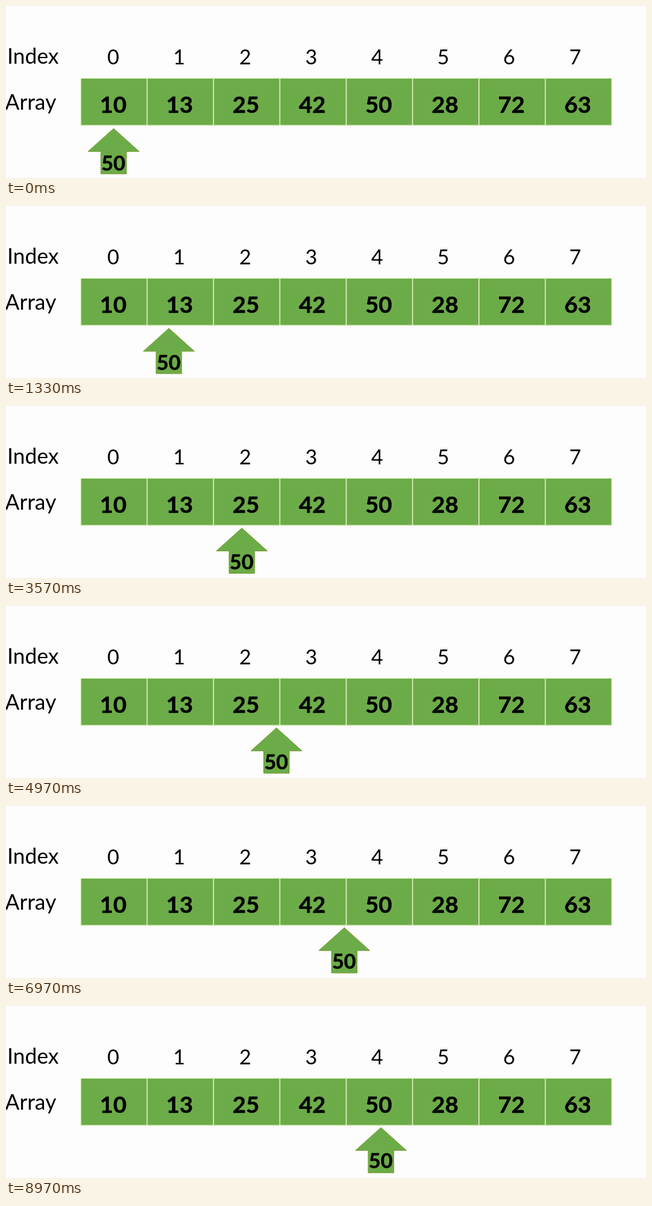
An HTML page that plays this animation: 1027 by 277 pixels, repeating every 9.93 s.

```html
<!DOCTYPE html>
<html lang="en">
<head>
<meta charset="utf-8">
<title>Linear search</title>
<style>
  html, body { margin: 0; width: 100%; height: 100%; overflow: hidden; background: #fdfdfe; }
  svg { display: block; width: 1027px; height: 277px; }
  text { font: 33px Lato, sans-serif; fill: #000; }
  .label { font-size: 34.3px; }
  .mid { text-anchor: middle; }
  .bold { font-size: 37px; font-weight: 700; stroke: #000; stroke-width: .5; }
  #key { font-size: 33px; }
  rect { fill: #6cac48; stroke: #e0efc4; stroke-width: 1.4; }
  path { fill: #6cac48; stroke: #78992f; }
</style>
</head>
<body>
<svg id="stage" viewBox="0 0 1027 277">
  <text class="label" x="2" y="93">Index</text>
  <text class="label" x="-1.5" y="167">Array</text>
  <path id="arrow" d="M0 0L41 37H20.5V73H-20.5V37H-41Z"/>
  <text id="key" class="mid bold">50</text>
</svg>
<script>
const stage = document.getElementById('stage');
const arrow = document.getElementById('arrow');
const key = document.getElementById('key');

function add(tag, attrs, content = '') {
  const el = document.createElementNS('http://www.w3.org/2000/svg', tag);
  for (const name in attrs) el.setAttribute(name, attrs[name]);
  el.textContent = content;
  stage.insertBefore(el, arrow);
}

const PITCH = 106.5, LEFT = 120, CENTER = 172;
[10, 13, 25, 42, 50, 28, 72, 63].forEach((value, i) => {
  const x = CENTER + i * PITCH;
  add('rect', { x: LEFT + i * PITCH, y: 116.3, width: PITCH, height: 76 });
  add('text', { x, y: 171.5, class: 'mid bold' }, value);
  add('text', { x: x - i * 0.6, y: 94, class: 'mid' }, i);
});

const stops = [173, 281, 384, 488, 602];
const LOOP = 9930, STEP = 2000, DELAY = 125, MOVE = 1720;
const ease = u => u < 0.5 ? 2 * u * u : 1 - 2 * (1 - u) ** 2;

function draw(now) {
  const t = now % LOOP;
  const i = Math.min(Math.floor(t / STEP), stops.length - 2);
  const u = ease(Math.min(Math.max((t - i * STEP - DELAY) / MOVE, 0), 1));
  const x = stops[i] + (stops[i + 1] - stops[i]) * u;
  const progress = i + u;
  arrow.setAttribute('transform', `translate(${x - 0.3} ${197.3 - progress * 0.4})`);
  key.setAttribute('x', x - 0.8);
  key.setAttribute('y', 265 - progress);
}

const start = performance.now();
function tick() {
  draw(performance.now() - start);
  requestAnimationFrame(tick);
}
tick();
</script>
</body>
</html>
```
